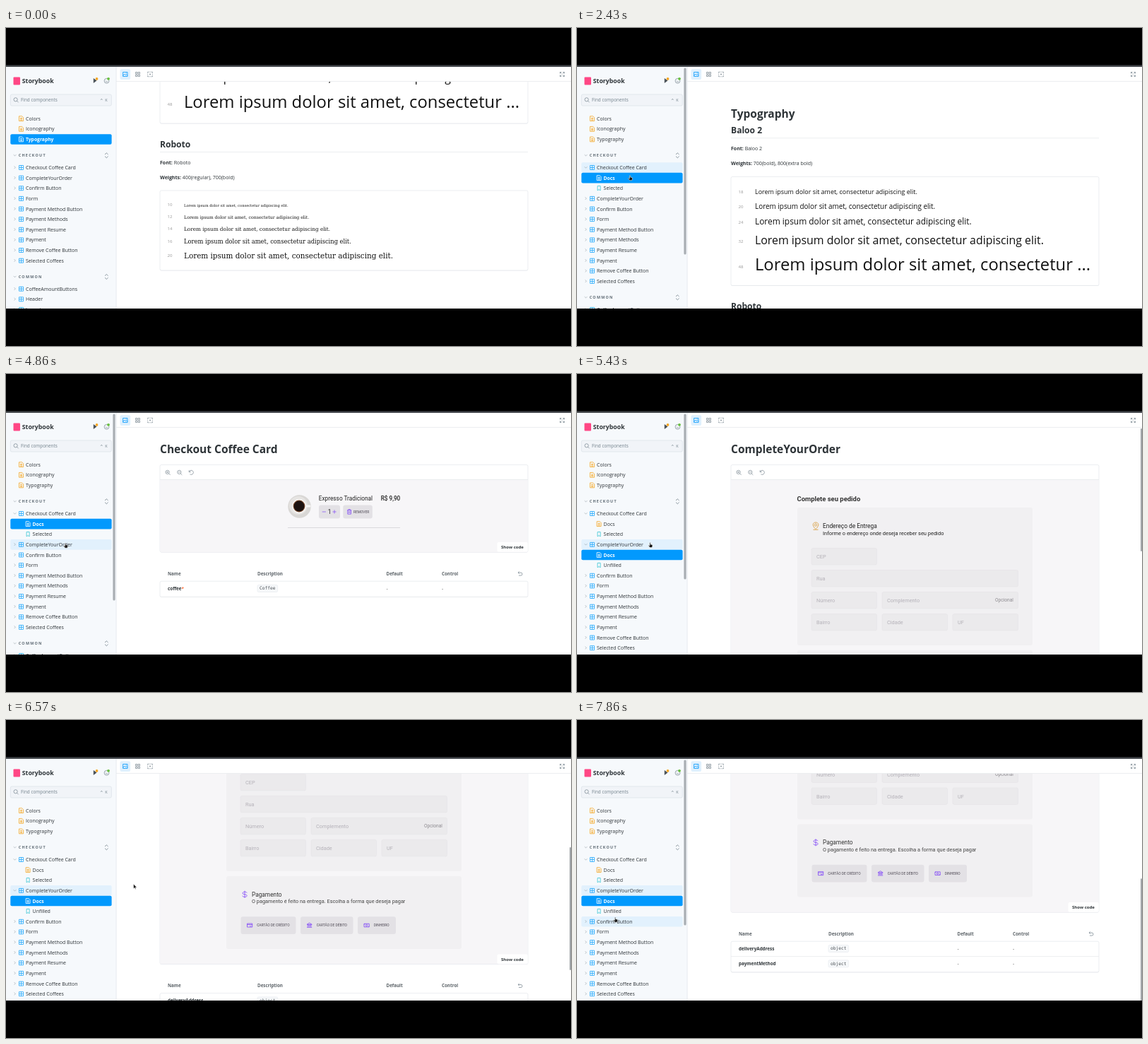
Animation of 800x450 px, one loop 8000 ms. Source, as an HTML page:

```html
<!DOCTYPE html>
<html lang="en">
<head>
<meta charset="utf-8">
<title>Component browser</title>
<style>
  html, body { margin: 0; height: 100%; overflow: hidden; background: #000; }
  svg { display: block; width: 100vw; height: 100vh; }
  text { font-family: "Open Sans", sans-serif; white-space: pre; }
  .app { font-family: Roboto, sans-serif; }
  .serif { font-family: "DejaVu Serif", serif; }
  .mono { font-family: "DejaVu Sans Mono", monospace; }
</style>
</head>
<body>
<svg viewBox="0 0 800 450">
  <clipPath id="view"><rect x="156" y="76" width="644" height="321"/></clipPath>
  <rect y="52" width="800" height="346" fill="#fff"/>
  <g clip-path="url(#view)"><g id="page"></g></g>
  <g id="toolbar"></g>
  <g id="sidebar"></g>
  <rect width="800" height="53"/>
  <rect y="52.5" width="800" height="2.5" fill="#42464b"/>
  <rect y="397" width="800" height="53"/>
  <path id="cursor" fill="#111" stroke="#fff" stroke-width=".5"/>
</svg>
<script>
const $ = id => document.getElementById(id);
const INK = '#2e3438', GREY = '#73828c', BLUE = '#0299fd', ORANGE = '#f5a623', PURPLE = '#8047f8';
const STEP = 1000 / 7, LOOP = 8000;

const rect = (x, y, w, h, fill, r = 0, stroke = 'none') =>
  `<rect x="${x}" y="${y}" width="${w}" height="${h}" rx="${r}" fill="${fill}" stroke="${stroke}" stroke-width=".6"/>`;
const text = (x, y, size, s, fill = INK, weight = 400, cls = '') =>
  `<text x="${x}" y="${y}" font-size="${size}" fill="${fill}" font-weight="${weight}" class="${cls}">${s}</text>`;
const icon = (x, y, d, color = GREY, width = .7) =>
  `<path transform="translate(${x} ${y})" d="${d}" fill="none" stroke="${color}" stroke-width="${width}"/>`;
const dot = (x, y, r, fill) => `<circle cx="${x}" cy="${y}" r="${r}" fill="${fill}"/>`;
const line = (x, y, w, color = '#e4e7ea') => rect(x, y, w, .7, color);

const ICON = {
  doc: 'M-3-3.4H1.2L3-1.6V3.4H-3ZM-1.5-.8H1.5M-1.5.6H1.5M-1.5 2H1.5',
  grid: 'M-3-3H3V3H-3ZM0-3V3M-3 0H3',
  story: 'M-2-3.2H2V3.2L0 1.8L-2 3.2Z',
  right: 'M-.9-1.8L.9 0L-.9 1.8',
  down: 'M-1.8-.9L0 .9L1.8-.9',
  sort: 'M-2.3-1.3L0-3.5L2.3-1.3M-2.3 1.3L0 3.5L2.3 1.3',
  lens: 'M2.2-.4A2.6 2.6 0 1 1-3-.4A2.6 2.6 0 1 1 2.2-.4M1.5 1.5L3.6 3.6',
  undo: 'M-1.2-3L-3-1.4L-1.2.2M-3-1.4H1A2 2 0 0 1 1 2.6H-2',
  reset: 'M-3-3V-.6H-.6M-2.8-.8A3 3 0 1 1-1.8 2.4',
  picture: 'M-3.2-3H3.2V3H-3.2ZM-3.2 2L-1-.4L.6 1.2L1.6.2L3.2 1.8M.8-1.4H1.8',
  tiles: 'M-3-3H-.6V-.6H-3ZM.6-3H3V-.6H.6ZM-3 .6H-.6V3H-3ZM.6 .6H3V3H.6Z',
  outline: 'M-3.3-1.6V-3.3H-1.6M1.6-3.3H3.3V-1.6M3.3 1.6V3.3H1.6M-1.6 3.3H-3.3V1.6M-.6-3.3H.6M-.6 3.3H.6M-3.3-.6V.6M3.3-.6V.6M-1 0H1M0-1V1',
  expand: 'M-3-1V-3H-1M-3-3L-.8-.8M1-3H3V-1M3-3L.8-.8M3 1V3H1M3 3L.8 .8M-1 3H-3V1M-3 3L-.8 .8',
  trash: 'M-3-2.2H3M-1.2-2.2V-3.3H1.2V-2.2M-2.3-2.2V3.2H2.3V-2.2M-.8-.6V1.6M.8-.6V1.6',
  pin: 'M0 4.5C-6-1-4-5 0-5S6-1 0 4.5ZM1.6-1.4A1.6 1.6 0 1 1-1.6-1.4A1.6 1.6 0 1 1 1.6-1.4M-3.5 5.3H3.5',
  dollar: 'M3-2C3-4-3-4.2-3-1.6C-3 .8 3.2-.6 3.2 1.9C3.2 4.4-3.2 4.2-3.2 1.9M0-5V5',
  card: 'M-3.6-2.5H3.6V2.5H-3.6ZM-3.6-1H3.6M0 1.4H2.4',
  bank: 'M-3.6-1.2L0-3.4L3.6-1.2ZM-2.4-1V2M-.8-1V2M.8-1V2M2.4-1V2M-3.6 2.8H3.6',
  cash: 'M-3.6-2.3H3.6V2.3H-3.6ZM1.2 0A1.2 1.2 0 1 1-1.2 0A1.2 1.2 0 1 1 1.2 0M-2.4-2.3L-3.6-1M2.4 2.3L3.6 1'
};

// Pages
const panel = (y, h) => rect(218, y + .6, 521, h, '#e9ecef', 2) + rect(218, y, 521, h, '#fff', 2, '#dfe3e8');
const title = s => text(218, 112, 15.5, s, INK, 700);
const fact = (y, label, value) =>
  text(218, y, 7, `<tspan font-weight="700">${label}:</tspan> ${value}`);
const LOREM = 'Lorem ipsum dolor sit amet, consectetur adipiscing elit.';

function fontBlock(y, name, weights, height, samples, scale, cls) {
  return text(218, y, 12.1, name, INK, 700) + line(218, y + 6.5, 521) +
    fact(y + 24, 'Font', name) + fact(y + 45, 'Weights', weights) + panel(y + 61.5, height) +
    samples.map(([size, base]) => text(228.5, y + base - size * .03, 6.1, size, '#999') +
      text(252, y + base + size * .04, size * scale, size > 40 ? LOREM.slice(0, 40) + '...' : LOREM, '#111', 400, cls)).join('');
}

function preview(bottom) {
  return panel(128.5, bottom - 128.5) + rect(218.3, 149.5, 520.4, bottom - 149.8, '#f7f6f8') +
    line(218, 149.3, 521) +
    icon(229, 139.3, ICON.lens + 'M-1.5-.4H.7M-.4-1.5V.7') +
    icon(245.7, 139.3, ICON.lens + 'M-1.5-.4H.7') + icon(262.2, 139.3, ICON.reset) +
    rect(695.5, bottom - 14, 43.2, 13.8, '#fff', 2) + text(701, bottom - 4.7, 6.05, 'Show code', INK, 700);
}

function table(y, rows) {
  const heads = [[229, 'Name'], [356, 'Description'], [538.5, 'Default'], [617, 'Control']];
  return heads.map(([x, s]) => text(x, y + 2.2, 6.25, s, '#5c6368', 700)).join('') +
    icon(728, y, ICON.undo) + panel(y + 10.7, rows.length * 21.3 + 1) +
    rows.map(([name, type], i) => {
      const c = y + 21.2 + i * 21.3;
      return (i ? line(218, c - 10.6, 521) : '') + text(229, c + 2.4, 6.3, name, INK, 700) +
        rect(356, c - 5.2, type.length * 3.73 + 6.2, 10, '#f6f8fa', 1.5, '#e6eaee') +
        text(359, c + 1.6, 6.2, type, '#4a4f54', 400, 'mono') +
        text(538.5, c + 2.3, 7, '-', '#555') + text(617, c + 2.3, 7, '-', '#555');
    }).join('');
}

const field = (x, y, w, s) => rect(x, y, w, 23.5, '#ebeaec', 2, '#e4e3e6') +
  text(x + 7, y + 14.5, 7.35, s, '#b4b1b8', 400, 'app');
const button = (x, y, w, h, glyph, s) => rect(x, y, w, h, '#e3e1e5', 3) +
  icon(x + (h > 20 ? 12.6 : 8.8), y + h / 2, glyph, PURPLE, .8) +
  text(x + (h > 20 ? 22.7 : 14.7), y + h / 2 + 1.8, 4.88, s, '#4a4550', 400, 'app');

const PAGES = {
  typography: text(218, 126.5, 15.5, 'Typography', INK, 700) +
    fontBlock(149, 'Baloo 2', '700(bold), 800(extra bold)', 154,
      [[18, 85.6], [20, 106.3], [24, 128.5], [32, 155.5], [48, 192]], .4963, '') +
    fontBlock(398, 'Roboto', '400(regular), 700(bold)', 113,
      [[10, 84], [12, 100.8], [14, 118.3], [16, 136.2], [20, 156.3]], .5208, 'serif'),

  coffee: title('Checkout Coffee Card') + preview(252) +
    dot(415.5, 187.5, 16.2, '#d9d7d5') + dot(414, 186, 13, '#e6e4e2') +
    rect(424, 185.5, 7.5, 3, '#f8f7f6', 1.5) + dot(415, 187, 10.3, '#f5f3f1') +
    dot(415, 187, 8.4, '#7a4a2c') + dot(415, 187, 7.4, '#1c1210') +
    text(442.8, 179, 8.28, 'Expresso Tradicional', '#222', 400, 'app') +
    text(530.7, 179, 8.2, 'R$ 9,90', '#222', 500, 'app') +
    rect(443, 185.5, 30, 19, '#e3e1e5', 3) + icon(450.3, 195, 'M-2.6 0H2.6', PURPLE) +
    text(455.8, 198, 8.3, '1', '#222', 400, 'app') + icon(465, 195, 'M-2.6 0H2.6M0-2.6V2.6', PURPLE) +
    button(477.3, 185.5, 41.5, 19, ICON.trash, 'REMOVER') +
    line(399, 217.2, 159, '#cfcdd2') +
    table(282.5, [['coffee<tspan fill="#ff4400" font-weight="400">*</tspan>', 'Coffee']]),

  order: title('CompleteYourOrder') + preview(515.5) +
    text(311.5, 179.5, 9.45, 'Complete seu pedido', '#333', 700, 'app') +
    rect(312, 189, 333, 195, '#f1f0f2', 3) +
    icon(338, 215, ICON.pin, '#dba145', .9) +
    text(348, 218, 8.4, 'Endereço de Entrega', '#222', 400, 'app') +
    text(348, 227.6, 7.45, 'Informe o endereço onde deseja receber seu pedido', '#222', 400, 'app') +
    field(332, 246.5, 92.5, 'CEP') + field(332, 277.5, 292.5, 'Rua') +
    field(332, 308.5, 92.5, 'Número') + field(432, 308.5, 192.5, 'Complemento') +
    text(592, 322, 6.6, 'Opcional', '#8d8a90', 400, 'app') +
    field(332, 339.5, 92.5, 'Bairro') + field(432, 339.5, 92.5, 'Cidade') + field(532, 339.5, 92.5, 'UF') +
    rect(312, 391, 333, 103, '#f1f0f2', 3) +
    icon(338, 416.8, ICON.dollar, PURPLE, .8) +
    text(348, 419.7, 8.3, 'Pagamento', '#333', 400, 'app') +
    text(348, 429.4, 7.35, 'O pagamento é feito na entrega. Escolha a forma que deseja pagar', '#444', 400, 'app') +
    button(332.5, 448.3, 78, 24.7, ICON.card, 'CARTÃO DE CRÉDITO') +
    button(417, 448.3, 74.5, 24.7, ICON.bank, 'CARTÃO DE DÉBITO') +
    button(498, 448.3, 54, 24.7, ICON.cash, 'DINHEIRO') +
    table(546, [['deliveryAddress', 'object'], ['paymentMethod', 'object']])
};

$('toolbar').innerHTML = rect(156, 55, 644, 20.5, '#fff') + line(156, 75.2, 644) +
  rect(161.5, 58.3, 14.6, 14.6, '#dff0fd', 2) + icon(168.8, 65.5, ICON.picture, BLUE, .8) +
  icon(186.5, 65.5, ICON.tiles) + icon(204, 65.5, ICON.outline) + icon(787.5, 65.5, ICON.expand);

// Sidebar
const HEAD = rect(0, 53, 156, 345, '#f6f9fc') + line(0, 55, 0) + rect(155.7, 55, .7, 343, '#dce2e8') +
  rect(10.5, 69.5, 9.5, 11, '#ff4785', 1) + text(22.8, 77.7, 8.75, 'Storybook', INK, 700) +
  '<path d="M123.8 71V78L128.5 74.5Z" fill="#4b5359"/>' + dot(128.5, 71.9, 1.9, ORANGE) +
  icon(142.5, 74.8, 'M3.4 0A3.4 3.4 0 1 1-3.4 0A3.4 3.4 0 1 1 3.4 0M-1.6 .6Q0 2.4 1.6 .6M-1.2-1V-.6') +
  dot(145, 71.8, 1.9, '#66bf3c') +
  rect(6.3, 94, 143, 16, '#f1f4f8', 2, '#d5dce3') + icon(14, 101.7, ICON.lens) +
  text(21, 103.8, 6.4, 'Find components', GREY) + icon(135.3, 101, 'M-1.2 .8L0-.8L1.2 .8') +
  text(140.3, 103.6, 5.6, 'K', GREY);

const CHECKOUT = ['Checkout Coffee Card', 'CompleteYourOrder', 'Confirm Button', 'Form', 'Payment Method Button',
  'Payment Methods', 'Payment Resume', 'Payment', 'Remove Coffee Button', 'Selected Coffees'];
const COMMON = ['CoffeeAmountButtons', 'Header', 'Layout'];
const ROW = 14.63;

function sidebar(s) {
  let y = 128.2, out = HEAD;
  const row = (id, label, x, glyph, color, open) => {
    const on = id === s.selected;
    const hover = s.cursor && s.cursor.x > 6 && s.cursor.x < 150 && Math.abs(s.cursor.y - y) < ROW / 2;
    if (on) out += rect(6.3, y - 7.3, 143.3, ROW, BLUE, 2);
    else if (hover || id === s.focus) out += rect(6.3, y - 7.3, 143.3, ROW, '#e2f1fd', 2);
    if (open !== undefined) out += icon(12.5, y - .2, open ? ICON.down : ICON.right, '#8f9aa2', .6);
    out += icon(x - 6.5, y, ICON[glyph], on ? '#fff' : color, .8) +
      text(x, y + 2.5, on ? 6.75 : 7, label, on ? '#fff' : INK, on ? 700 : 400);
    y += ROW;
  };
  const section = label => {
    y += 8.2;
    out += icon(12.5, y - .2, ICON.down, '#8f9aa2', .6) + icon(142.3, y, ICON.sort, GREY, .8) +
      `<g letter-spacing="1.25">${text(17.8, y + 2, 5.4, label, '#5f6b74', 700)}</g>`;
    y += 17.2;
  };
  for (const name of ['Colors', 'Iconography', 'Typography']) row(name, name, 28, 'doc', ORANGE);
  section('CHECKOUT');
  for (const name of CHECKOUT) {
    const story = s.open[name];
    row(name, name, 28, 'grid', '#1ea7fd', !!story);
    if (story) {
      row(name + '/docs', 'Docs', 37.6, 'doc', ORANGE);
      row(name + '/story', story, 37.6, 'story', '#37c5d3');
    }
  }
  section('COMMON');
  for (const name of COMMON) row(name, name, 28, 'grid', '#1ea7fd', false);
  if (s.bar) out += rect(151.4, 56.5, 3.2, 294 - 30 * Object.keys(s.open).length, '#a9aeb3', 1.6);
  return out;
}

// Motion, counted in steps of a seventh of a second
const PATH = [[8, 22, 330], [11, 60, 235], [13, 74, 197], [15, 74, 199], [17, 74, 208.5], [19, 82, 209], [23, 193.8, 189],
  [25, 193.8, 189], [31, 95, 215], [34, 83, 239], [37, 83, 239], [41, 160.7, 236.5], [46, 180.5, 232],
  [50, 180.5, 232], [55, 53, 279]];

function cursorAt(n) {
  if (n < PATH[0][0]) return null;
  const i = PATH.findIndex(p => p[0] > n);
  if (i < 0) return { x: PATH.at(-1)[1], y: PATH.at(-1)[2] };
  const [a, b] = [PATH[i - 1], PATH[i]], k = (n - a[0]) / (b[0] - a[0]);
  return { x: a[1] + (b[1] - a[1]) * k, y: a[2] + (b[2] - a[2]) * k };
}

const ARROW = 'M0 0V6.7L1.6 5.3L2.6 7.5L3.6 7L2.6 4.9H4.7Z';
const HAND = 'M.5 .4Q1.1-.4 1.7 .4V2.7L4.4 3.3V5.4L3.7 7.2H.7L-1.4 4.4L-.7 3.8L.5 4.8Z';

function draw(n) {
  const [first, second] = CHECKOUT, open = {};
  if (n >= 14) open[first] = 'Selected';
  if (n >= 36) open[second] = 'Unfilled';
  const cursor = cursorAt(n);
  $('sidebar').innerHTML = sidebar({
    open, cursor,
    selected: n < 16 ? 'Typography' : (n < 36 ? first : second) + '/docs',
    focus: n < 14 ? '' : n < 33 ? first : n > 33 ? second : '',
    bar: n >= 8 && !(n > 26 && n < 30) && !(n > 43 && n < 52)
  });

  const name = n < 20 ? 'typography' : n < 38 ? 'coffee' : 'order';
  const k = Math.min(1, Math.max(0, (n - 43) / 6));
  const scroll = n < 16 ? 229.5 : 243.5 * (1 - (1 - k) ** 1.73);
  const thumb = name === 'order' ? rect(798, 77 + scroll * 1.605, 2, 174, '#a3a7ab', 1) : '';
  $('page').innerHTML = PAGES[name] + thumb;
  $('page').setAttribute('transform', `translate(0 ${-scroll})`);

  $('cursor').setAttribute('visibility', cursor ? 'visible' : 'hidden');
  if (cursor) {
    $('cursor').setAttribute('d', cursor.x < 150 ? HAND : ARROW);
    $('cursor').setAttribute('transform', `translate(${cursor.x} ${cursor.y})`);
  }
}

let shown = -1;
function tick() {
  const n = Math.floor((performance.now() % LOOP + 4) / STEP);
  if (n !== shown) draw(shown = n);
  requestAnimationFrame(tick);
}
tick();
</script>
</body>
</html>
```
